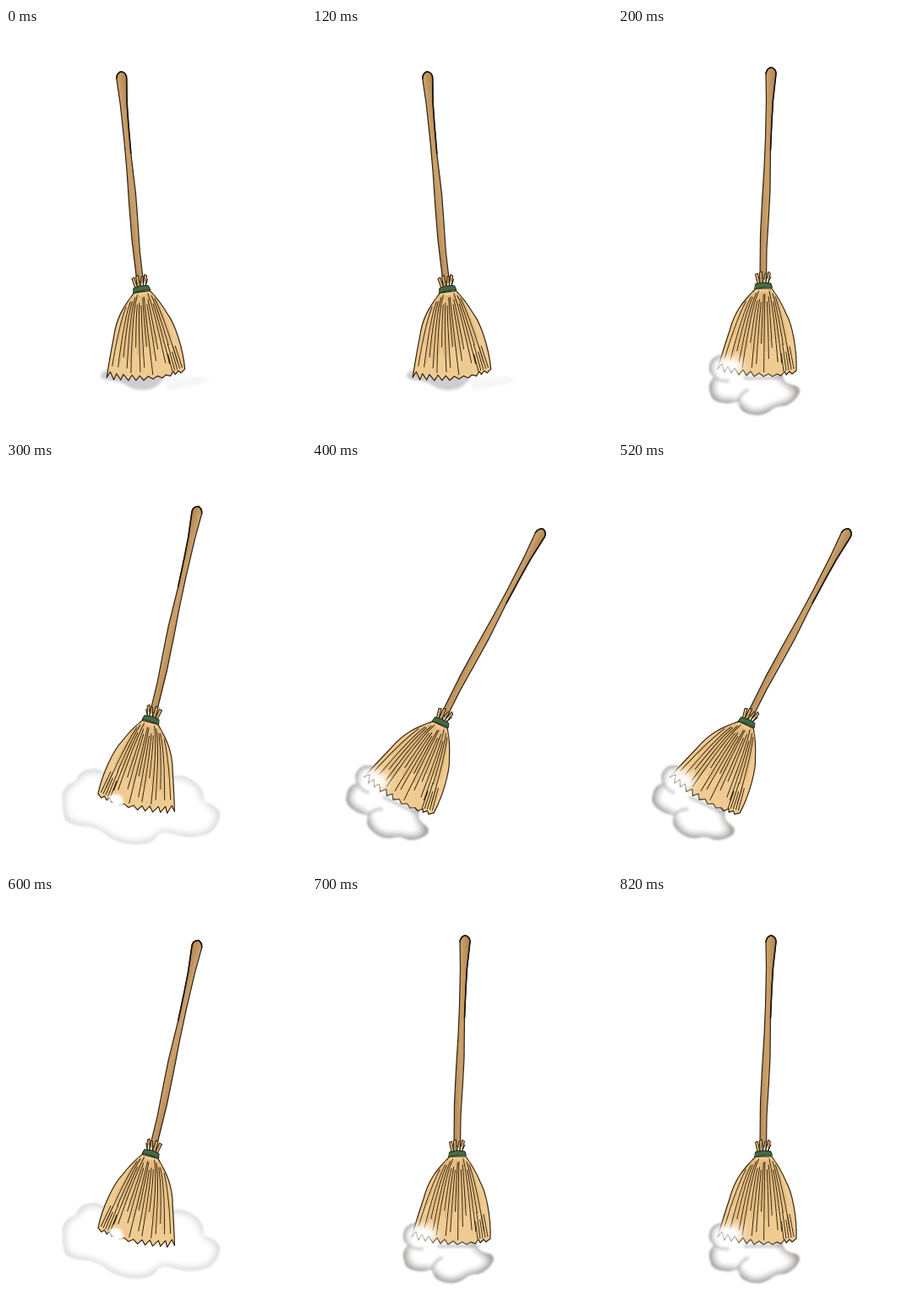
These frames come from a looping animation (355x480 px, 900 ms). An HTML page:

```html
<!DOCTYPE html>
<html lang="en">
<head>
<meta charset="utf-8">
<title>Sweeping broom</title>
<style>
html, body { margin: 0; height: 100%; overflow: hidden; background: #fff; }
svg { display: block; width: 100%; height: 100%; }
</style>
</head>
<body>
<svg viewBox="0 0 355 480" stroke-linecap="round" stroke-linejoin="round">
  <defs>
    <!-- the fill colour stays on the rim and turns white inwards -->
    <filter id="cloud" color-interpolation-filters="sRGB">
      <feGaussianBlur in="SourceAlpha" stdDeviation="7"/>
      <feColorMatrix values="0 0 0 0 1  0 0 0 0 1  0 0 0 0 1  0 0 0 2.2 -1.1"/>
      <feComposite in2="SourceAlpha" operator="in" result="core"/>
      <feMerge><feMergeNode in="SourceGraphic"/><feMergeNode in="core"/></feMerge>
      <feGaussianBlur stdDeviation=".8"/>
    </filter>
    <filter id="soft" x="-50%" y="-50%" width="200%" height="200%"><feGaussianBlur stdDeviation="5"/></filter>
    <filter id="haze" x="-50%" y="-50%" width="200%" height="200%"><feGaussianBlur stdDeviation="1.5"/></filter>
    <linearGradient id="wood">
      <stop offset="0" stop-color="#b98b58"/>
      <stop offset=".45" stop-color="#cba26b"/>
      <stop offset="1" stop-color="#b08250"/>
    </linearGradient>

    <g id="broom" fill="none">
      <path fill="url(#wood)" stroke="#2b2014" stroke-width="1.2" d="M168 296L168.500 245 170.500 205 173 165 174.500 130 175.500 85 175 54Q176 48 181 46.500Q187 48 187 54L183.500 85 182 110 180.500 144 180 192 178.500 220 176 260 175.500 296Z"/>
      <path stroke="#17110a" stroke-width="1.600" d="M175 54Q176 48 181 46.500Q187 48 187 54L183.500 85 182 110 180.500 144"/>
      <path fill="#dcae6c" stroke="#2b2014" d="M165 303L162.500 291 165.500 290 168 303 167.500 289 170.500 288 171 303 174 290 176 290 174.500 303 178 288 180.500 290 177 303 181 294"/>
      <path id="head" fill="#efcb92" stroke="#33230f" stroke-width="1.200"/>
      <path id="streaks" stroke="#d0a264" stroke-width="2" opacity=".4"/>
      <path id="straws" stroke="#38270f"/>
      <path fill="#426b43" stroke="#1e2c1c" d="M163 302.500Q172 299.500 181 302L182.500 307Q172 306 162 308.500Z"/>
    </g>

    <g id="dusty">
      <path fill="#aaa6a3" filter="url(#cloud)" d="M124 386Q109 388 108 400Q106 407 114 413Q105 420 109 431Q110 441 123 443Q134 445 142 441Q143 453 154 456Q169 461 181 452Q186 447 197 447Q209 443 215 431Q216 423 206 422Q195 420 194 408L160 390Z"/>
      <path fill="none" stroke="#8f8b88" stroke-width="4" opacity=".4" filter="url(#haze)" d="M114 413Q122 418 130 417M142 441Q145 432 153 428M150 414H190"/>
      <use href="#broom"/>
      <ellipse cx="130" cy="400" rx="18" ry="11" fill="#fff" filter="url(#soft)"/>
      <path id="fringe" fill="none" stroke="#8c8377" opacity=".6"/>
    </g>
  </defs>

  <g class="pose">
    <g fill="#cdcdd2" filter="url(#haze)">
      <path d="M122 404Q111 406 112 412Q114 417 127 417Q138 419 145 424Q156 430 170 427Q182 424 188 412Z"/>
      <path opacity=".18" d="M188 414Q215 409 242 415Q238 421 190 429Z"/>
    </g>
    <use href="#broom" transform="translate(160 308) rotate(-7.400) translate(-172 -304)"/>
  </g>
  <g class="pose"><use href="#dusty"/></g>
  <g class="pose">
    <path fill="#dedede" filter="url(#cloud)" d="M108 363Q91 361 84 373Q84 378 75 380Q64 388 67 402Q66 412 70 423Q76 430 98 431Q112 434 121 443Q140 454 160 452Q174 451 181 440Q191 436 201 441Q223 447 242 438Q255 426 253 414Q248 405 234 401Q235 385 222 377Q211 369 196 371L150 380Z"/>
    <use href="#broom" transform="translate(172 304) rotate(14.500) scale(-1 1) translate(-172 -304)"/>
    <path fill="#fff" filter="url(#haze)" d="M121 395Q130 391 135 394Q140 399 138 407Q125 408 121 395Z"/>
  </g>
  <g class="pose"><use href="#dusty" transform="translate(153 307) rotate(25.800) translate(-172 -304)"/></g>
</svg>
<script>
const setPath = (id, d) => document.getElementById(id).setAttribute('d', d);

const leftTeeth = '118 403 123 397 126 407 130 400 134 408 138 402 143 410 148 404 152 411 157 406 161 412';
const rightTeeth = '167 408 172 412 178 409 183 412 188 409 193 411 197 406 199 410 203 406 206 409 211 405';
setPath('head', `M163 308C148 323 138 335 132 358Q124 382 118 403L${leftTeeth} ${rightTeeth}
  C212 380 206 350 199 338C194 326 188 316 182 308Z`);
setPath('fringe', 'M' + leftTeeth + ' ' + rightTeeth.slice(0, 39));

let seed = 7;
const rand = () => (seed = seed * 16807 % 2147483647) / 2147483647;

// u runs across the head, v runs down it
const spot = (u, v) => {
  const x = 163 + 19 * u + (74 * u - 45) * v ** .65;
  const y = 308 + (96 + 7 * Math.sin(Math.PI * u)) * v;
  return x.toFixed(1) + ' ' + y.toFixed(1);
};
const straw = (u, from, to) => 'M' + Array.from({ length: 9 }, (_, i) =>
  spot(u, from + (to - from) * i / 8)).join('L');

let straws = '', streaks = '';
for (let i = 1; i < 17; i++) {
  const u = (i + rand() * .5 - .25) / 17;
  straws += straw(u, .02 + rand() * .15, i % 3 ? .8 + rand() * .17 : .6 + rand() * .2);
  streaks += straw(u + .025, .05, .5 + rand() * .4);
}
// short straws bunched at the right corner
for (let i = 0; i < 5; i++) straws += straw(.84 + i * .033, .55 + rand() * .25, .98);
setPath('straws', straws);
setPath('streaks', streaks);

// pose held in each 100 ms slot
const slots = [0, 0, 1, 2, 3, 3, 2, 1, 1];
const poses = document.querySelectorAll('.pose');
function draw() {
  const now = slots[Math.floor(performance.now() % 900 / 100)];
  poses.forEach((p, i) => p.style.display = i === now ? '' : 'none');
  requestAnimationFrame(draw);
}
draw();
</script>
</body>
</html>
```
